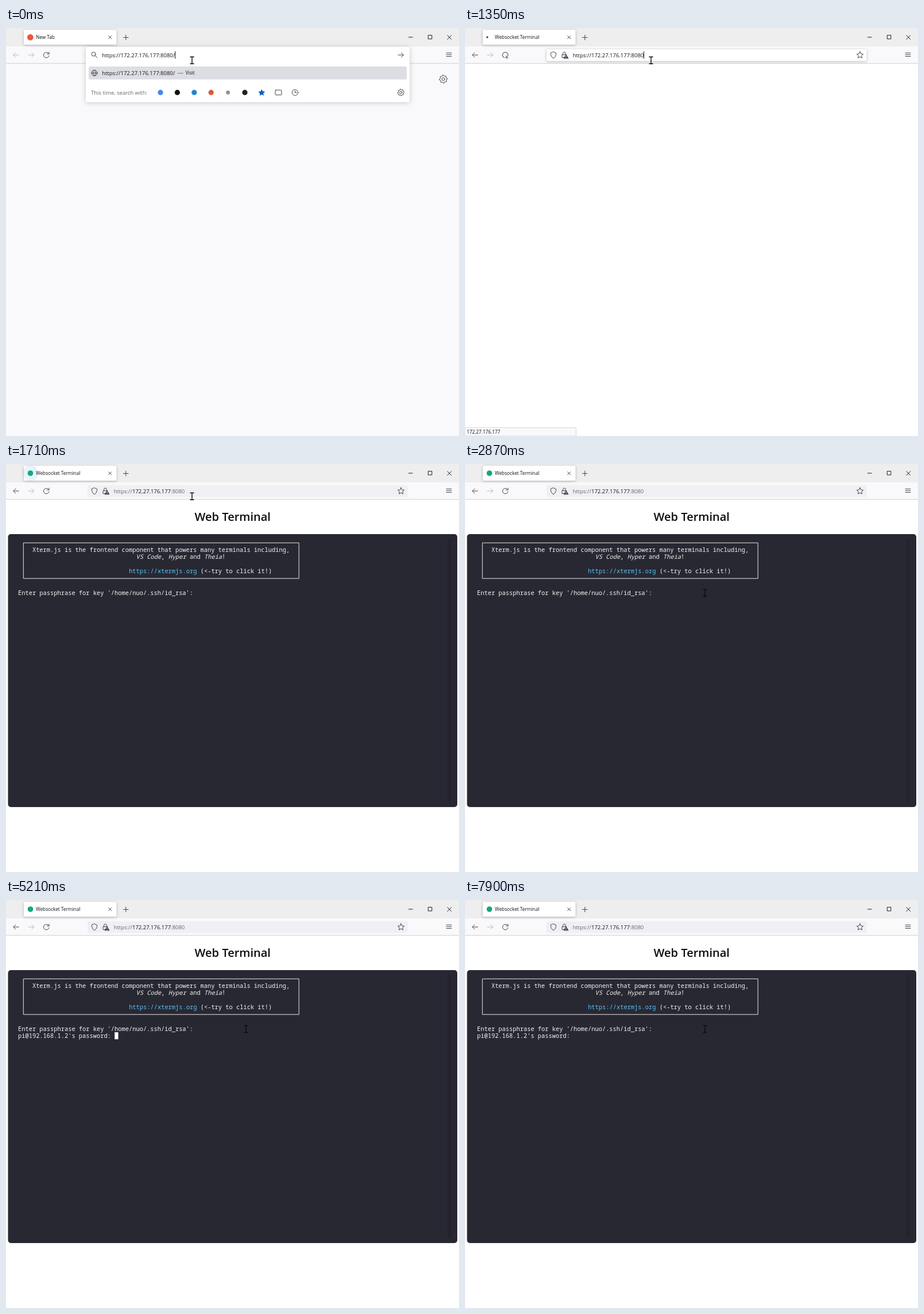
An HTML page that plays this animation: 789 px wide and 710 px high, repeating every 7990 ms.

```html
<!DOCTYPE html>
<html lang="en">
<head>
<meta charset="utf-8">
<title>Web Terminal</title>
<style>
  html, body { margin: 0; width: 100%; height: 100%; overflow: hidden; background: #fff; }
  svg { display: block; font-family: "Open Sans", "Noto Sans", sans-serif; }
  text { white-space: pre; fill: #15141a; }
  .tab { font-size: 8.25px; }
  .url { font-size: 9.47px; }
  .dim { fill: #66666f; }
  .icon { fill: none; stroke: #45454d; stroke-width: 1; stroke-linecap: round; stroke-linejoin: round; }
  .sharp { fill: none; stroke: #1c1c1c; stroke-width: 1; }
  .term { font: 10.38px "Noto Sans Mono", "DejaVu Sans Mono", monospace; }
  .term text { fill: #f4f4f0; }
  .term .link { fill: #58c4f2; }
  .soft { filter: drop-shadow(0 1px 2px #0004); }
</style>
</head>
<body>
<svg width="789" height="710" viewBox="0 0 789 710">
  <rect width="789" height="32" fill="#eeeeef"/>
  <rect y="32" width="789" height="30" fill="#f9f9fb"/>

  <!-- window and tab strip -->
  <rect class="soft" x="31" y="3" width="161.5" height="26" rx="2.5" fill="#fff"/>
  <g id="burst"><circle cx="43" cy="16" r="13.5" fill="#1593f5"/></g>
  <circle id="newIcon" cx="42.3" cy="16.2" r="5.4" fill="#f0543c"/>
  <circle id="siteIcon" cx="42.5" cy="16" r="4.8" fill="#14a77c"/>
  <circle id="loadDot" cy="16" r="1.7" fill="#45454d"/>
  <text id="newTitle" class="tab" x="52" y="19.4">New Tab</text>
  <text id="siteTitle" class="tab" x="52" y="19.4">Websocket Terminal</text>
  <path class="icon" d="M178.7 13.7l5 5m0-5l-5 5M204.5 16.5h8.5m-4.25-4.25v8.5"/>
  <path class="sharp" d="M701 16h7.5M735.3 12.5h6.5v6.5h-6.5zM768.5 12.5l7.5 7.5m0-7.5l-7.5 7.5"/>

  <!-- toolbar -->
  <path id="back" class="icon" d="M22.3 47H13m3.7-4L12.7 47l4 4"/>
  <path class="icon" opacity=".35" d="M39 47h9.3m-3.7-4l4 4-4 4"/>
  <path id="stop" class="icon" d="M66.7 43.5l7 7m0-7l-7 7"/>
  <path id="reload" class="icon" d="M74.4 44.6A4.8 4.8 0 1 0 75 48M75 41.8V45.2H71.6"/>
  <path class="icon" stroke-linecap="butt" d="M767 43.5h9m-9 3h9m-9 3h9"/>

  <!-- page states -->
  <rect id="newPage" y="62" width="789" height="648" fill="#f9f9fb"/>
  <rect id="blankPage" y="62" width="789" height="648" fill="#fff"/>
  <g id="status">
    <path d="M0 695.5h193.5V710H0z" fill="#f9f9fb" stroke="#d9d9de"/>
    <text x="3" y="706.3" class="tab" font-size="8.1" fill="#45454d">172.27.176.177</text>
  </g>
  <g id="page">
    <text x="394.7" y="99" text-anchor="middle" font-size="20" font-weight="600" style="fill:#0c0c0c">Web Terminal</text>
    <rect x="3.5" y="122" width="782.5" height="475" rx="5" fill="#282833"/>
    <rect id="track" y="130" height="458" fill="#23232d"/>
    <g id="banner" class="term">
      <path d="M30.3 137.2H510.2V199.2H30.3z" fill="none" stroke="#e8e8e6"/>
    </g>
    <g id="prompts" class="term"></g>
    <rect id="block" width="6.3" height="12.2" fill="#fff"/>
  </g>
  <path d="M0 61.5h789" stroke="#d2d2d6"/>

  <!-- address bar -->
  <rect id="barIdle" x="142" y="37" width="557.5" height="20.5" rx="2.5" fill="#f0f0f4"/>
  <rect id="barFocus" class="soft" x="142" y="37" width="557.5" height="20.5" rx="2.5" fill="#fff"/>
  <g id="barIcons">
    <path class="icon" d="M154 41.6l4.6 1.9c.2 4.2-1.2 7.2-4.6 9.4-3.4-2.2-4.8-5.2-4.6-9.4z"/>
    <path class="icon" d="M173 51.5h-4v-5h8M170.6 46.300v-2a2.400 2.400 0 0 1 4.800 0v2"/>
    <path d="M176 46.500l4 6.300h-8z" fill="#45454d" stroke="#45454d" stroke-linejoin="round"/>
    <path d="M176 48.300v2m0 .8v.8" stroke="#fff" stroke-width=".9"/>
    <path id="bookmark" class="icon"/>
  </g>
  <text id="urlFocus" class="url" x="187.700" y="50.800">https://172.27.176.177:8080</text>
  <text id="urlIdle" class="url dim" x="187.700" y="50.800">https://<tspan fill="#15141a">172.27.176.177</tspan>:8080</text>
  <path id="caret" d="M311.500 40.500v13" stroke="#111"/>

  <!-- suggestions -->
  <g id="dropdown">
    <rect x="139" y="33" width="564" height="96" rx="2.500" fill="#fff" style="filter:drop-shadow(0 1px 4px #0003)"/>
    <circle class="icon" cx="152.600" cy="45.500" r="3.500"/>
    <path class="icon" d="M155.200 48.100l3.600 3.600M683 47h9.300m-4-4l4 4-4 4"/>
    <text class="url" x="167.200" y="50.800">https://172.27.176.177:8080/</text>
    <path d="M294.700 40.500v13" stroke="#111"/>
    <rect x="144" y="67" width="554" height="22.500" rx="2.500" fill="#dddde4"/>
    <circle class="icon" cx="154" cy="78.300" r="5"/>
    <path class="icon" stroke-width=".8" d="M149 78.300h10M154 73.300c-3 3-3 7 0 10c3-3 3-7 0-10"/>
    <text class="url" x="167.200" y="82">https://172.27.176.177:8080/</text>
    <path d="M299 78.800h9.800" stroke="#77777f"/>
    <text class="tab" x="312.700" y="81.400">Visit</text>
    <text class="url dim" x="148" y="116">This time, search with:</text>
    <g id="engines"></g>
    <path id="favStar" fill="#0b5fc4"/>
    <rect class="icon" x="469" y="108" width="11" height="8.500" rx="1"/>
    <circle class="icon" cx="503.500" cy="112.200" r="5.200"/>
    <path class="icon" d="M503.500 109v3.500h2.500"/>
  </g>
  <g id="gears"></g>

  <g id="mouse"><path d="M-3.500-6h2.700L0-5.300.8-6h2.700M0-5.300V5.300M-3.500 6h2.700L0 5.300.8 6h2.700" fill="none" stroke="#0b0b0d" stroke-width="1.400"/></g>
</svg>
<script>
const LOOP = 7990, CELL = 6.23, LINE = 12.43;
const $ = id => document.getElementById(id);
const set = (id, attrs) => { for (const k in attrs) $(id).setAttribute(k, attrs[k]); };
const show = (id, on) => { $(id).style.display = on ? '' : 'none'; };
const add = (parent, tag, attrs, text = '') => {
  const el = document.createElementNS('http://www.w3.org/2000/svg', tag);
  for (const k in attrs) el.setAttribute(k, attrs[k]);
  el.textContent = text;
  return $(parent).appendChild(el);
};

const colX = col => 21 + col * CELL;
const put = (parent, col, row, text, attrs = {}) =>
  add(parent, 'text', { x: colX(col), y: 153 + (row - 2) * LINE, ...attrs }, text);

// Closed radial outline; radius(i) gives the distance of point i.
const radial = (x, y, count, radius) => 'M' + Array.from({ length: count }, (_, i) => {
  const a = i / count * 2 * Math.PI - Math.PI / 2, r = radius(i);
  return `${(x + r * Math.cos(a)).toFixed(2)} ${(y + r * Math.sin(a)).toFixed(2)}`;
}).join('L') + 'Z';
const star = (x, y, r) => radial(x, y, 10, i => i % 2 ? r * .48 : r);
const gear = (x, y, r) => {
  add('gears', 'path', { class: 'icon', d: radial(x, y, 32, i => (i + 1) % 4 < 2 ? r : r * .77) });
  add('gears', 'circle', { class: 'icon', cx: x, cy: y, r: r * .36 });
};

set('bookmark', { d: star(688, 47.2, 6) });
set('favStar', { d: star(445.3, 112.7, 6.3) });
gear(761.7, 89, 7);
gear(687.8, 112.2, 5.8);
['#4285f4', '#111', '#1b86dc', '#de5833', '#9a8f9a', '#222'].forEach((fill, i) =>
  add('engines', 'circle', { cx: 269 + i * 29.4, cy: 112.2, r: i === 4 ? 3.5 : 4.6, fill }));

const italic = { 'font-style': 'italic' };
put('banner', 4, 2, 'Xterm.js is the frontend component that powers many terminals including,');
put('banner', 33, 3, 'VS Code', italic);
put('banner', 40, 3, ',');
put('banner', 42, 3, 'Hyper', italic);
put('banner', 48, 3, 'and');
put('banner', 52, 3, 'Theia', italic);
put('banner', 57, 3, '!');
put('banner', 31, 5, 'https://xtermjs.org', { class: 'link' });
put('banner', 51, 5, '(<-try to click it!)');
put('prompts', 0, 8, "Enter passphrase for key '/home/nuo/.ssh/id_rsa':");
const password = put('prompts', 0, 9, "pi@192.168.1.2's password:");

// Visible spans of the block cursor: [from, to, column, row].
const blinks = [
  [2240, 2870, 50, 8], [3500, 4130, 50, 8],
  [4130, 4670, 27, 9], [5210, 5830, 27, 9], [6280, 7270, 27, 9],
  [7270, 7810, 0, 10]
];
const T = { enter: 990, blank: 1170, page: 1440, banner: 1530, prompt: 1620, password: 4130 };
const between = (t, a, b) => t >= a && t < b;
const ease = p => p * p * (3 - 2 * p);

function render(t) {
  const typing = t < T.enter, loading = between(t, T.enter, T.page);
  const fresh = t < T.blank, ready = t >= T.page;

  show('dropdown', typing);
  show('newIcon', typing);
  show('newTitle', fresh);
  show('newPage', fresh);
  show('gears', fresh);
  $('gears').children[2].style.display = $('gears').children[3].style.display = typing ? '' : 'none';
  show('siteTitle', !fresh);
  show('siteIcon', ready);
  show('loadDot', loading);
  set('loadDot', { cx: 42.5 - 3.8 * Math.cos((t - 1330) / 450 * Math.PI) });
  show('blankPage', !fresh);
  show('status', between(t, T.blank, T.page));
  set('back', { opacity: fresh ? .35 : 1 });

  show('stop', between(t, T.enter, 1260));
  show('reload', !between(t, T.enter, 1260));
  set('reload', { transform: `rotate(${between(t, 1260, T.page) ? 95 : 0} 70.2 47)` });

  show('barIdle', ready);
  show('barFocus', loading);
  show('barIcons', !typing);
  show('urlFocus', loading);
  show('urlIdle', ready);
  show('caret', loading);

  const fade = (t - T.page) / 340;
  show('burst', fade >= 0 && fade < 1);
  set('burst', { opacity: .5 * (1 - fade) });

  show('page', ready);
  show('banner', t >= T.banner);
  show('prompts', t >= T.prompt);
  password.style.display = t >= T.password ? '' : 'none';
  set('track', t < T.banner ? { x: 783, width: 4 } : { x: 769, width: 5.5 });

  const blink = blinks.find(([from, to]) => between(t, from, to));
  show('block', blink);
  if (blink) set('block', { x: colX(blink[2]), y: 230.1 + (blink[3] - 9) * LINE });

  const p = ease(Math.min(1, Math.max(0, (t - 2060) / 720)));
  set('mouse', { transform: `translate(${324 + 94 * p} ${56.3 + 168.2 * p})` });
}

const start = performance.now();
function tick() {
  render((performance.now() - start) % LOOP);
  requestAnimationFrame(tick);
}
tick();
</script>
</body>
</html>
```
